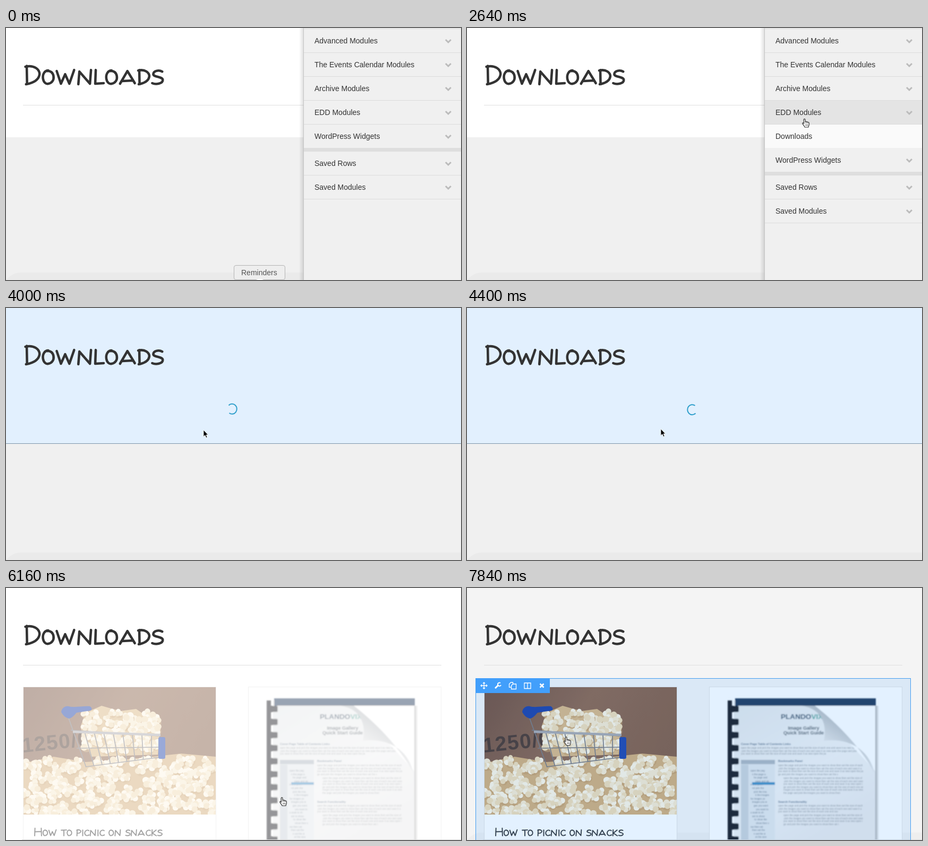
An HTML page that plays this animation: 857x475 px, repeating every 8 s.

```html
<!DOCTYPE html>
<html lang="en">
<head>
<meta charset="utf-8">
<title>Downloads module</title>
<style>
html, body { margin: 0; width: 100%; height: 100%; overflow: hidden; background: #fff; }
svg { display: block; width: 100vw; height: 100vh; }
text { font-family: "Liberation Sans", Arial, sans-serif; white-space: pre; }
.panel text { font-size: 14px; fill: #333; }
.ink path { fill: none; stroke: #333; stroke-linecap: round; stroke-linejoin: round; }
.chev { fill: none; stroke: #bbb; stroke-width: 3; }
.icon { fill: none; stroke: #fff; stroke-width: 1.3; }
</style>
</head>
<body>
<svg id="stage" viewBox="0 0 857 475"></svg>
<script>
const LOOP = 8000, STEP = 80;

// Hand lettering: advance and strokes, baseline at y = 28.
const GLYPHS = {
  A: [35.5, 'M1 27 15 3 29 26M5 22 26 21'],
  C: [25, 'M21 5C14-1 3 5 2 15 2 27 13 30 22 24'],
  D: [24.5, 'M2 1 2.5 27M0 2C13-1 21 6 21 13 20 21 12 26 1 28'],
  H: [30, 'M3 1 2 28M25 1 26 28M2 14 26 13'],
  I: [12, 'M5 2 5 28'],
  K: [27, 'M4 1 3 28M22 2 5 16 23 28'],
  L: [21, 'M3 1 2 27 18 26'],
  N: [32, 'M2 28 4 4 24 27 26 1'],
  O: [27, 'M12 2C5 2 1 9 2 17 3 25 8 28 12 27 19 26 23 20 22 13 21 6 16 2 10 3'],
  P: [24, 'M4 1 3 28M2 3C14-2 22 5 20 10 18 15 10 17 4 17'],
  S: [25, 'M21 4C14 0 4 3 4 9 4 15 22 13 22 20 22 27 9 29 2 26'],
  T: [26, 'M1 3 25 2M13 3 13 28'],
  W: [40, 'M1 3 9 27 17 9 25 27 34 1']
};

function lettering(str, x, base, size) {
  let pen = 0, out = '';
  for (const ch of str) {
    if (ch === ' ') { pen += 16; continue; }
    const up = ch.toUpperCase(), k = ch === up ? 1.28 : 1, [adv, d] = GLYPHS[up];
    out += `<path d="${d}" stroke-width="${4.6 / k}" transform="translate(${pen}) scale(${k}) translate(0 -28)"/>`;
    pen += adv * k;
  }
  return `<g class="ink" role="img" aria-label="${str}" transform="translate(${x} ${base}) scale(${size})">${out}</g>`;
}

const rect = (x, y, w, h, fill, more = '') =>
  `<rect x="${x}" y="${y}" width="${w}" height="${h}" fill="${fill}" ${more}/>`;
const label = (x, y, str, more = '') => `<text x="${x}" y="${y}" ${more}>${str}</text>`;
const path = (d, more = '') => `<path d="${d}" ${more}/>`;

let seed = 11;
const rnd = () => (seed = (seed * 16807) % 2147483647) / 2147483647;

// Sidebar
const row = (name, y) =>
  label(21, y + 27, name) + path(`M268 ${y + 20}l5 5 5-5`, 'class="chev"') + rect(1, y + 44, 296, 1, '#dcdcdc');

const panel = () => `<g id="panel" class="panel">
  ${rect(-8, 0, 8, 475, 'url(#shade)')}${rect(0, 0, 297, 475, '#f0f0f0')}
  ${rect(1, 1, 296, 1, '#dcdcdc')}${rect(1, 0, 296, 44, '#e4e4e4', 'id="hover"')}
  ${row('Advanced Modules', 2)}${row('The Events Calendar Modules', 47)}
  ${row('Archive Modules', 92)}${row('EDD Modules', 137)}
  <g id="sub">${rect(1, 182, 296, 44, '#fafafa', 'id="subBg"')}${label(21, 209, 'Downloads', 'id="subText"')}</g>
  <g id="lower">${rect(1, 182, 296, 300, '#f0f0f0')}${rect(1, 182, 296, 44, '#e4e4e4', 'id="hoverLow"')}
    ${row('WordPress Widgets', 182)}${rect(1, 226, 296, 7, '#dedede')}
    ${row('Saved Rows', 233)}${row('Saved Modules', 278)}</g>
  ${rect(0, 0, 1, 475, '#c4c4c4')}</g>`;

// Snack picture: each kernel is a shadow under three pale lobes
function kernels(n, place) {
  const tones = ['#fdf4e2', '#f7e8cc', '#efdab2'];
  let out = '';
  for (let i = 0; i < n; i++) {
    const [x, y] = place(i / n), r = 4 + rnd() * 2.5, turn = rnd() * 6.3;
    out += `<circle cx="${x + 1}" cy="${y + 3}" r="${r * 1.5}" fill="#c39a62" opacity=".6"/>`;
    tones.forEach((tone, k) => {
      const a = turn + k * 2.1;
      out += `<circle cx="${x + Math.cos(a) * r * .8}" cy="${y + Math.sin(a) * r * .7}" r="${r}" fill="${tone}"/>`;
    });
  }
  return out;
}

function snackPhoto() {
  let wires = 'M122 268 290 279M150 337 290 319M133 302 291 300M116 240 151 338';
  for (let i = 1; i < 9; i++) wires += `M${130 + i * 18} ${270 + i}L${150 + i * 15.5} ${337 - i * 2}`;
  return `<g clip-path="url(#photoClip)">${rect(33, 187, 362, 240, 'url(#sack)')}<g filter="url(#soft)">
    ${label(31, 310, '1250/0', 'font-size="39" font-weight="bold" letter-spacing="1.5" fill="#3b2922" opacity=".8" transform="rotate(-6 33 308)"')}
    ${path('M140 262 150 235 180 222 215 232 245 228 270 245 290 268 286 314 160 318Z', 'fill="#d9b580"')}
    ${kernels(70, p => [148 + rnd() * 136, 230 + p * 76 + (1 - p) * rnd() * 12])}
    ${path('M33 330 90 318 150 328 240 322 330 312 395 318V437H33Z', 'fill="#d2ab74"')}
    ${kernels(230, p => [33 + rnd() * 362, 322 + p * 108])}
    ${path(wires, 'fill="none" stroke="#77757a" stroke-width="1.7"')}
    ${path('M126 271 291 277', 'stroke="#a7a5aa" stroke-width="4.5"')}
    ${path('M104 234C105 226 111 222 118 223 128 226 145 222 158 223 163 226 162 230 159 231L133 235C129 239 124 246 118 246 111 244 107 239 104 234Z', 'fill="#173ba3"')}
    ${rect(287, 281, 13, 41, '#1b3fa8', 'rx="3"')}</g></g>`;
}

// Booklet picture
const WORDS = 'open the page and pick the images you want to show then set the size of each one and save it as new ';
function para(x, y, w, n, gap = 5.6) {
  let out = '';
  for (let i = 0; i < n; i++) {
    const from = (i * 17) % 40, len = Math.round((i === n - 1 ? .7 : 1) * w / 2.15);
    out += label(x, y + i * gap, WORDS.repeat(3).substr(from, len), 'font-size="4.6" fill="#8d9196"');
  }
  return out;
}

function booklet() {
  let teeth = '', tree = '';
  for (let y = 222; y < 475; y += 24.6) teeth += rect(495, y, 17, 12, '#15181c', 'rx="3"');
  for (let i = 0; i < 20; i++)
    tree += label(534 + (i % 4) * 3, 346 + i * 6.6, WORDS.substr(i * 3, 12), 'font-size="4.6" fill="#6c7a88"');
  const head = (x, y, s) => label(x, y, s, 'font-size="5.5" font-weight="bold" fill="#5b6f86"');
  return `<g filter="url(#blur)">${rect(768, 222, 8, 260, 'url(#edge)')}${rect(503, 212, 266, 270, 'url(#paper)')}
    ${rect(505, 208, 265, 14, '#1d3557')}
    ${label(591, 247, 'PLANDO<tspan fill="#3f9c8f">VIX</tspan>', 'font-size="13.6" font-weight="bold" fill="#23405c"')}
    <g font-size="9" font-weight="bold" fill="#4c565f" text-anchor="middle">
      ${label(634, 267, 'Image Gallery')}${label(634, 276, 'Quick Start Guide')}</g>
    ${head(516, 296, 'Cover Page Table of Contents Links')}${para(516, 303, 236, 3)}
    ${rect(516, 324, 64, 156, '#e2e6ea')}${rect(516, 324, 64, 8, '#aab4be')}
    ${rect(516, 333, 14, 146, '#c9d1d8')}${tree}${rect(537, 366, 43, 5, '#3d8cc0')}
    ${head(586, 328, 'Bookmarks Panel')}${para(586, 336, 165, 4)}${para(596, 360, 154, 6)}
    ${head(586, 405, 'Search Functionality')}${para(586, 412, 165, 3)}${para(596, 430, 154, 4)}
    ${path('M655 222H769V345Z', 'fill="#fff"')}
    ${path('M630 222C672 228 678 262 672 288 720 282 758 305 767 348 742 300 692 250 655 222Z', 'fill="url(#fold)"')}
    ${rect(491, 212, 8, 270, '#15181c')}${teeth}</g>`;
}

const card = (x, inside) => rect(x + .5, 186.5, 363, 320, '#fff', 'stroke="#e2e2e2"') + inside;

// Pointers
const HAND = 'M3.3 9.5V2.2C3.3.4 6 .4 6 2.2V6.2C6.4 5.3 8.4 5.4 8.6 6.6 9.2 5.9 10.9 6.2 11 7.4 11.7 6.8 13.3 7.2 13.3 8.6V11.5C13.3 13.5 12 14 12 16.5H5.2C5 14.5 2.6 13 1.2 10.2.2 8.3 1.8 7.6 3.3 9.5Z';
const CROSS = 'M0-6V6M-6 0H6M-2-4 0-6 2-4M-2 4 0 6 2 4M-4-2-6 0-4 2M4-2 6 0 4 2';
const pointers = `
  <g id="arrow">${path('M0 0V12.5L2.9 9.8 5 14.6 7 13.7 5 9.1H8.6Z', 'fill="#000" stroke="#fff" stroke-width=".8"')}</g>
  <g id="hand">${path(HAND, 'fill="#fff" stroke="#333" stroke-width="1.2"')}
    ${path('M6.9 11V14M8.8 11V14M10.7 11V14M6 6V9.5M8.6 7V9.5M11 8V9.5', 'stroke="#444" stroke-width=".8"')}</g>
  <g id="drag"><circle r="16.5" fill="#fff" stroke="#000" stroke-width="1.1"/>
    <circle cy="2" r="6" fill="#ccc"/>${path(CROSS, 'fill="none" stroke="#000" stroke-width="2"')}</g>`;

const toolbar = `<g id="module">
  ${rect(16.5, 170.5, 819, 320, '#42a0fa', 'fill-opacity=".15" stroke="#429cf0"')}
  ${rect(16, 170, 140, 28, '#429ffb')}
  <g class="icon">${path(CROSS, 'transform="translate(32 184)"')}
    ${path('M53 189 59 183', 'stroke-width="3"')}${path('M63 179A3.2 3.2 0 1 0 64 183', 'stroke-width="2"')}
    ${path('M83.500 187H79.500V181L82.500 178H86.500V181M83.500 184 86.500 181H92.500V190.500H83.500Z')}
    ${path('M108 179H120V189.500H108ZM114 179V189.500')}
    ${path('M137.500 180.500 144.500 187.500M144.500 180.500 137.500 187.500', 'stroke-width="2.600"')}</g></g>`;

const stage = document.getElementById('stage');
stage.innerHTML = `<defs>
  <linearGradient id="shade"><stop stop-color="#000" stop-opacity="0"/><stop offset="1" stop-color="#000" stop-opacity=".12"/></linearGradient>
  <linearGradient id="sack" x2="1" y2=".4"><stop stop-color="#704a37"/><stop offset=".5" stop-color="#8a6148"/><stop offset="1" stop-color="#80583f"/></linearGradient>
  <linearGradient id="paper" x2=".6" y2="1"><stop stop-color="#e3e6e8"/><stop offset=".6" stop-color="#f0f1f2"/><stop offset="1" stop-color="#e8e8ea"/></linearGradient>
  <linearGradient id="edge"><stop stop-color="#999"/><stop offset="1" stop-color="#fff"/></linearGradient>
  <linearGradient id="fold" x1=".1" y1="1" x2=".6" y2=".3"><stop stop-color="#fff"/><stop offset=".5" stop-color="#eee"/><stop offset="1" stop-color="#b9bdc1"/></linearGradient>
  <filter id="blur"><feGaussianBlur stdDeviation="1"/></filter>
  <filter id="soft"><feGaussianBlur stdDeviation=".6"/></filter>
  <clipPath id="photoClip">${rect(33, 187, 362, 240, '#000')}</clipPath></defs>
  ${rect(0, 0, 857, 475, '#fff')}
  ${rect(0, 0, 857, 475, '#e2f0fe', 'id="blue"')}${rect(0, 0, 857, 475, '#f4f4f4', 'id="dim"')}
  ${rect(0, 206, 857, 300, '#f0f0f0', 'id="below"')}
  ${path('M0 475C8 466 16 461 28 461H857V475Z', 'id="band" opacity=".022"')}
  <g id="head">${lettering('Downloads', 36.5, 106, .994)}${rect(32, 145, 788, 1, '#e0e0e0', 'id="rule"')}</g>
  ${rect(0, 255, 857, 1, '#7d96aa', 'id="line"')}
  ${path('M429.500 184A9 9.500 0 1 0 430.500 198.500', 'id="spin" fill="none" stroke="#2f9fcb" stroke-width="2"')}
  <g id="dashes" fill="none" stroke="#4ea6ea" stroke-dasharray="4 2">
    ${rect(12.5, 65.5, 832, 213, 'none')}${rect(29.5, 82.5, 798, 179, 'none')}</g>
  <g id="cards">${card(32, snackPhoto() + lettering('How to picnic on snacks', 53, 467, .417))}
    ${card(456, booklet())}</g>
  ${rect(30, 474, 827, 1, '#ddd', 'id="foot"')}
  <g id="status">${path('M0 467H349Q353 467 353 471V475H0Z', 'fill="#e0e0e0"')}
    ${label(22, 479, 'site.test/#/the-snack-downloads/finding-your-lifestyle/#/', 'font-size="12.5" fill="#444"')}</g>
  ${toolbar}${panel()}
  <g id="tip">${path('M433 447.500H522Q525.500 447.500 525.500 451V471Q525.500 474.500 522 474.500H433Q429.500 474.500 429.500 471V451Q429.500 447.500 433 447.500Z', 'fill="#eee" stroke="#b4b4b4"')}
    ${path('M471 475 475 473H481L485 475Z', 'fill="#fff"')}${label(443, 466, 'Reminders', 'font-size="14" fill="#555"')}</g>
  ${pointers}`;

const $ = {};
for (const el of stage.querySelectorAll('[id]')) $[el.id] = el;
const put = (id, name, value) => $[id].setAttribute(name, value);
const move = (id, x, y) => put(id, 'transform', `translate(${x} ${y})`);
const show = (id, on) => { $[id].style.display = on ? '' : 'none'; };
const ramp = (t, a, b) => Math.min(1, Math.max(0, (t - a) / (b - a)));

// Pointer track: time, x, y, shape from then on
const TRACK = [
  [0, 478, 492, 'arrow'], [240, 485, 462, 'arrow'], [640, 580, 300, 'hand'], [960, 655, 156, 'hand'],
  [1120, 612, 167, 'hand'], [1200, 628, 162, 'hand'], [2560, 628, 162, 'hand'], [2880, 640, 196, 'hand'],
  [3120, 642, 203, 'drag'], [3280, 619, 197, 'drag'], [3920, 385, 232, 'drag'], [4000, 372, 230, 'arrow'],
  [4400, 365, 228, 'arrow'], [4800, 463, 388, 'arrow'], [4960, 475, 404, 'arrow'], [5200, 475, 404, 'arrow'],
  [5680, 515, 394, 'hand'], [6960, 519, 394, 'arrow'], [7440, 360, 325, 'hand'], [7760, 227, 276, 'hand'],
  [7840, 182, 280, 'hand'], [8000, 182, 280, 'hand']
];

function pointerAt(t) {
  let i = TRACK.length - 2;
  while (TRACK[i][0] > t) i--;
  const [t0, x0, y0, shape] = TRACK[i], [t1, x1, y1] = TRACK[i + 1], p = ramp(t, t0, t1);
  // The hand rests while the cards fade in.
  if (t0 === 5680) return { x: x0, y: y0, shape };
  return { x: x0 + (x1 - x0) * p, y: y0 + (y1 - y0) * p, shape };
}

function cardOpacity(t) {
  if (t < 5280) return 0;
  if (t < 6000) return .12 * ramp(t, 5200, 5680);
  if (t < 6400) return .12 + .33 * ramp(t, 5920, 6160);
  return .45 + .55 * ramp(t, 6320, 6640);
}

function render(t) {
  const cur = pointerAt(t);
  for (const shape of ['arrow', 'hand', 'drag']) show(shape, shape === cur.shape);
  move(cur.shape, cur.x, cur.y);
  show('tip', t < 320);

  // Sidebar
  const open = 45 * ramp(t, 2080, 2320), over = cur.x > 557 && t < 3120, y = cur.y + 3;
  const onSub = t >= 3120 || (over && open === 45 && y >= 182 && y < 227);
  show('panel', t < 3440);
  move('panel', 560 + 196 * Math.max(0, t - 3120) / 160, 0);
  move('lower', 0, open);
  show('sub', open > 0);
  put('subBg', 'fill', onSub ? '#1176a0' : '#fafafa');
  $.subText.style.fill = onSub ? '#fff' : '#333';
  const top = 2 + 45 * Math.floor((y - 2) / 45);
  show('hover', over && y < 182);
  put('hover', 'y', top);
  const low = y - open, lowTop = low >= 278 ? 278 : low >= 233 ? 233 : 182;
  show('hoverLow', over && !onSub && low >= 182 && low < 322);
  put('hoverLow', 'y', lowTop);

  // Page
  const dragging = t >= 3120 && t < 4000, loading = t >= 4000 && t < 5120;
  show('dashes', dragging);
  move('head', dragging ? 18 : 0, dragging ? 50 : 0);
  show('rule', !loading);
  show('line', loading);
  show('spin', t >= 4000 && t < 4800);
  put('spin', 'transform', `rotate(${(t - 4400) * .45} 425 191)`);
  const edge = t < 3120 ? 206 : dragging ? 351 : loading ? 255 : 447 + 40 * ramp(t, 5200, 5680);
  put('below', 'y', edge);
  show('band', t < 5280 || t >= 7360);
  show('foot', t >= 5680);

  // Result
  put('blue', 'opacity', loading ? 1 : ramp(t, 6320, 6640));
  put('dim', 'opacity', ramp(t, 6960, 7360));
  put('cards', 'opacity', cardOpacity(t));
  show('status', t >= 6960 && t < 7200);
  show('module', t >= 7200);
}

const start = performance.now();
function tick() {
  const t = (performance.now() - start) % LOOP;
  render(Math.floor(t / STEP) * STEP);
  requestAnimationFrame(tick);
}
render(0);
requestAnimationFrame(tick);
</script>
</body>
</html>
```
